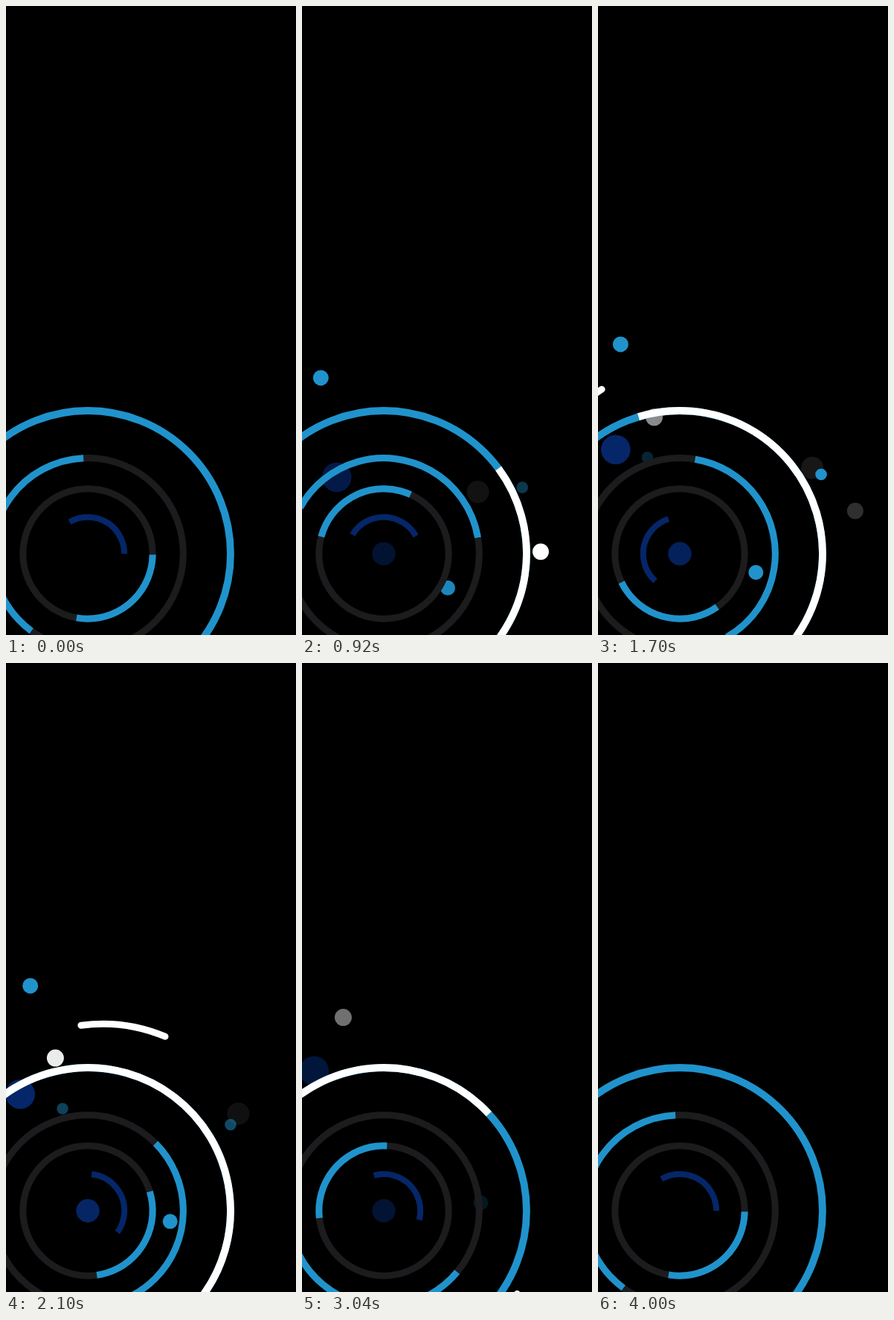
Animation, 390 px wide and 844 px high, one loop 4020 ms. Source, as an HTML page with a canvas:

```html
<!DOCTYPE html>
<html lang="en">
<head>
<meta charset="utf-8">
<title>Orbit rings</title>
<style>
  html, body { margin: 0; width: 100%; height: 100%; overflow: hidden; background: #000; }
  canvas { display: block; width: 390px; height: 844px; }
</style>
</head>
<body>
<canvas id="stage"></canvas>
<script>
const W = 390, H = 844, LOOP = 4020, TURN = 4000;
const CX = 110, CY = 735;
const BLUE = '#2093cc', NAVY = '#052668', TRACK = '#1c1c1e', DARK = '#171718', WHITE = '#fff';

const canvas = document.getElementById('stage');
const ctx = canvas.getContext('2d');
const dpr = window.devicePixelRatio || 1;
canvas.width = W * dpr;
canvas.height = H * dpr;

const rad = deg => deg * Math.PI / 180;
const clamp = v => Math.max(0, Math.min(1, v));
const mix = (a, b, u) => a + (b - a) * u;
const smooth = u => u * u * (3 - 2 * u);
const easeOut = (u, power) => 1 - Math.pow(1 - u, power);

function arc(x, y, r, width, color, from = 0, to = 360) {
  ctx.strokeStyle = color;
  ctx.lineWidth = width;
  ctx.beginPath();
  ctx.arc(x, y, r, rad(from), rad(to));
  ctx.stroke();
}

// Full track with a coloured arc that makes whole turns per loop
function ring(t, { r, width = 9, track, color, from, sweep, turns }) {
  const a = from + 360 * turns * t / TURN;
  if (track) arc(CX, CY, r, width, track);
  arc(CX, CY, r, width, color, a, a + sweep);
}

// Dot drifting between two points, fading in and out over its life
function dot(t, { color, r, start = 0, end, fade, fadeOut = fade, from, to = from, ease = [1, 1] }) {
  if (t <= start || t >= end) return;
  const u = (t - start) / (end - start);
  const [x, y] = from.map((v, i) => mix(v, to[i], easeOut(u, ease[i])));
  ctx.globalAlpha = clamp(Math.min((t - start) / fade, (end - t) / fadeOut));
  ctx.fillStyle = color;
  ctx.beginPath();
  ctx.arc(x, y, r, 0, Math.PI * 2);
  ctx.fill();
  ctx.globalAlpha = 1;
}

// Rounded stroke swinging clockwise around a slightly offset pivot
function swing(t) {
  if (t < 1540 || t > 3250) return;
  ctx.save();
  ctx.translate(122, 704.6);
  ctx.rotate(rad(mix(-62, 136, smooth(clamp((t - 1540) / 1500)))));
  ctx.lineCap = 'round';
  arc(8, -3.4, 217, 9, WHITE, -97.9, -67.4);
  ctx.restore();
}

function draw(t) {
  ctx.setTransform(dpr, 0, 0, dpr, 0, 0);
  ctx.fillStyle = '#000';
  ctx.fillRect(0, 0, W, H);

  dot(t, { color: BLUE, r: 10.5, end: 2930, fade: 630, from: [18.7, 557.7], to: [36.4, 400.2], ease: [1.24, 1.24] });
  dot(t, { color: WHITE, r: 11, end: 1850, fade: 820, from: [291.6, 796.7], to: [350.7, 667] });
  dot(t, { color: NAVY, r: 19.8, end: 3800, fade: 1300, from: [119.6, 683], to: [16.2, 534], ease: [4.4, 1.5] });
  dot(t, { color: NAVY, r: 15.7, end: 4000, fade: 1950, from: [CX, CY] });
  dot(t, { color: DARK, r: 15, end: 2900, fade: 1150, from: [170, 693.6], to: [351, 580.6], ease: [1.2, 1.2] });
  dot(t, { color: BLUE, r: 7.8, start: 700, end: 2390, fade: 580, from: [295.2, 651], to: [303.4, 613] });
  dot(t, { color: BLUE, r: 10, end: 3200, fade: 1000, from: [176.8, 805.4], to: [243.7, 720] });
  dot(t, { color: WHITE, r: 11.5, start: 1400, end: 3900, fade: 550, fadeOut: 1950, from: [84.5, 567.7], to: [53.7, 413.2], ease: [2.7, 0.85] });
  dot(t, { color: BLUE, r: 7.7, start: 1300, end: 2810, fade: 1600, from: [56.8, 613.5], to: [93.1, 584.2] });

  ring(t, { r: 192, width: 9.8, track: BLUE, color: WHITE, from: 46.2, sweep: 184.8, turns: -1 });
  ring(t, { r: 128.4, track: TRACK, color: BLUE, from: 126.2, sweep: 141.2, turns: 1 });
  ring(t, { r: 87.2, track: TRACK, color: BLUE, from: 0.8, sweep: 99.2, turns: -2 });
  ring(t, { r: 49.2, width: 8, color: NAVY, from: -120, sweep: 120, turns: 4 });
  swing(t);
}

let start;
function tick(now) {
  if (start === undefined) start = now;
  draw((now - start) % LOOP);
  requestAnimationFrame(tick);
}
draw(0);
requestAnimationFrame(tick);
</script>
</body>
</html>
```
